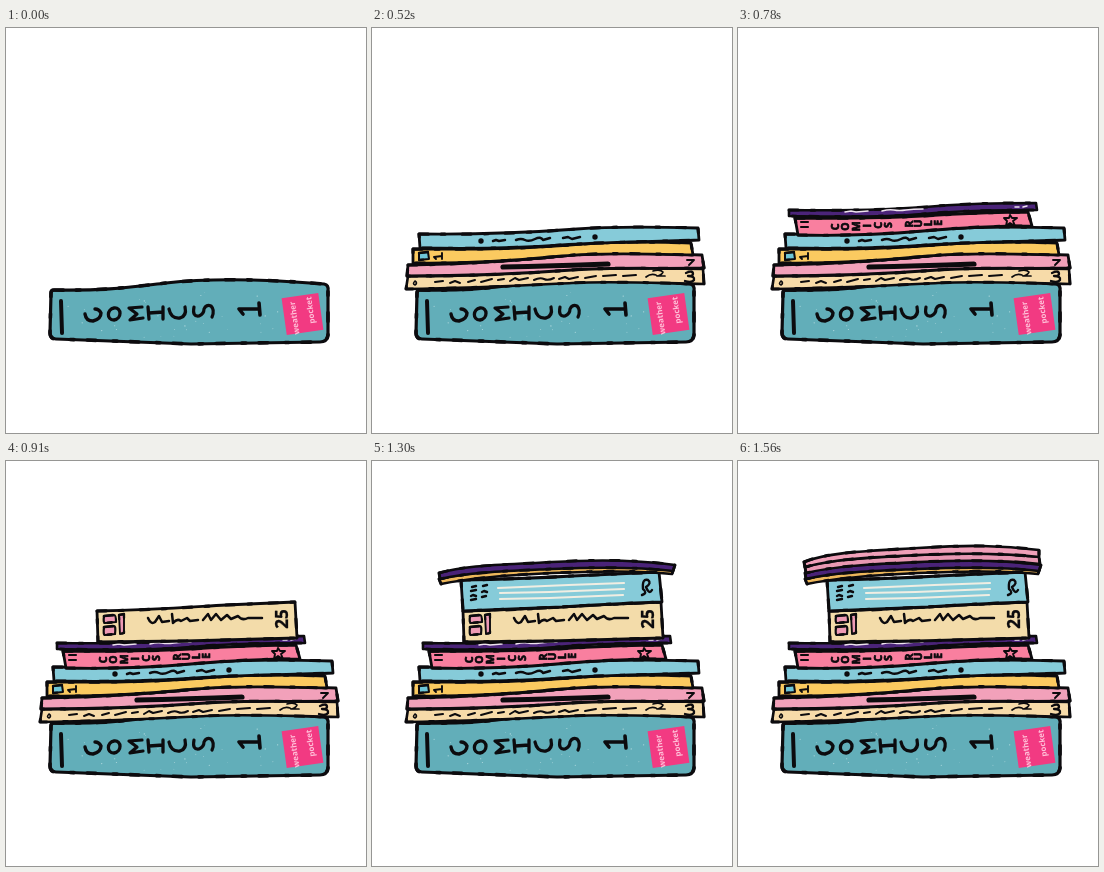
An HTML page with a canvas that plays this animation: 360 by 405 pixels, repeating every 1.82 s.

```html
<!DOCTYPE html>
<html lang="en">
<head>
<meta charset="utf-8">
<title>Book stack</title>
<style>
  html, body { margin: 0; width: 100%; height: 100%; overflow: hidden; background: #fff; }
  canvas { display: block; }
</style>
</head>
<body>
<canvas id="stage" width="360" height="405"></canvas>
<script>
const ctx = document.getElementById("stage").getContext("2d");
const STEP = 130, LOOP = 1820;
const INK = "#0c0b0e";
ctx.lineCap = ctx.lineJoin = "round";

function line(d, width = 2, color = INK) {
  ctx.strokeStyle = color;
  ctx.lineWidth = width;
  ctx.stroke(new Path2D(d));
}

// Filled shape with a slightly uneven, brush-like outline.
function cover(d, fill, width = 2.8) {
  ctx.fillStyle = fill;
  ctx.fill(new Path2D(d));
  line(d, width);
  ctx.setLineDash([9, 13, 4, 17]);
  line(d, width + 0.4);
  ctx.setLineDash([]);
}

function dot(x, y, r, color = INK) {
  ctx.fillStyle = color;
  ctx.beginPath();
  ctx.arc(x, y, r, 0, 7);
  ctx.fill();
}

function glyph(text, x, y, size, angle = -90, color = INK, weight = 0.7) {
  ctx.save();
  ctx.translate(x, y);
  ctx.rotate(angle * Math.PI / 180);
  ctx.font = `bold ${size}px "Open Sans", sans-serif`;
  ctx.textAlign = "center";
  ctx.textBaseline = "middle";
  ctx.fillStyle = ctx.strokeStyle = color;
  ctx.lineWidth = weight;
  ctx.fillText(text, 0, 0);
  if (weight) ctx.strokeText(text, 0, 0);
  ctx.restore();
}

// Letters stacked down the spine, each turned on its side.
function stack(word, x, y, pitch, size) {
  [...word].forEach((c, i) => glyph(c, x + i * pitch, y - i * 0.4, size));
}

function random(seed) {
  return () => (seed = seed * 16807 % 2147483647) / 2147483647;
}

function specks(count, x, y, w, h, seed) {
  const rnd = random(seed);
  for (let i = 0; i < count; i++) {
    dot(x + rnd() * w, y + rnd() * h, 0.3 + rnd() * 0.35, "rgba(235,250,250,.65)");
  }
}

function label() {
  ctx.save();
  ctx.translate(296.5, 286);
  ctx.rotate(-0.14);
  ctx.fillStyle = "#f23a82";
  ctx.fillRect(-18.5, -18.5, 37, 37);
  ctx.restore();
  glyph("weather", 289, 290, 8, -98, "#ffc0d8", 0);
  glyph("pocket", 305, 282, 8, -98, "#ffc0d8", 0);
}

function bigBook() {
  cover("M48 262 C100 263 125 259 160 255 S245 250 318 256 Q323 257 322 263 L322 307 Q321 314 314 314 Q240 315 185 316 Q110 313 50 311 Q44 311 44 305 L45 265 Q45 262 48 262 Z", "#62aeb9", 3.2);
  specks(32, 62, 262, 210, 48, 71);
  line("M55 273 L56 305", 4);
  line("M79 286 Q80 293 87 293 Q95 291 95 285 Q93 281 89 281", 3.4);
  line("M108 280 C116 279 116 291 108 292 C100 292 101 281 108 280", 3.3);
  line("M137 290 L124 292 L131 286 L123 280 L136 279", 3.2);
  line("M142 279 L143 291 M143 285 L157 284 M157 279 L157 291", 3.3);
  line("M163 281 Q165 291 174 290 Q181 288 179 279", 3.3);
  line("M188 279 Q186 289 193 288 Q198 286 198 281 Q200 276 205 278 Q209 282 206 289", 3.2);
  line("M237 286 L233 281 L253 281 M253 275 L254 287", 3.6);
  label();
}

function beigeSlim() {
  cover("M36 248 C110 248 150 245 190 242 S285 240 331 241 L332 256 C280 255 240 253 200 255 S110 260 34 261 Z", "#f7dba9", 2.6);
  line("M43 253 Q46 255 43 257 Q40 256 43 253", 1.6);
  line("M63 254 L71 253 M78 255 L83 253 L88 255 M96 254 L103 252 M109 254 L120 251 M126 252 L132 251 M138 253 L143 250 L147 252 L156 250 M162 252 Q168 249 172 251 T182 250 M187 251 L193 249 L197 251 L206 249 M213 250 L224 248 M231 248 L244 247 M251 248 L264 247", 2);
  line("M274 249 Q279 245 284 247 M281 243 Q288 241 291 244 Q290 247 285 248 L293 248", 1.7);
  line("M314 245 Q321 242 321 246 Q321 248 316 248 Q323 248 322 252 Q320 255 313 253", 2.3);
}

function pinkSlim() {
  cover("M36 237 C100 236 150 232 190 228 S280 225 330 227 L332 240 C280 241 240 239 200 242 S110 248 35 248 Z", "#f2a1ba");
  line("M131 239 Q180 238 236 236", 5.2);
  line("M315 232 L322 232 L317 237", 1.9);
}

function yellowBook() {
  cover("M41 221 C130 222 170 219 210 216 S290 214 319 215 L321 227 C280 226 230 224 190 228 S100 236 41 235 Z", "#fbca60");
  cover("M47 225 L56 224 L57 231 L47 232 Z", "#6ec6d8", 2);
  line("M62 229 L70 228 M70 225 L70 231 M62 229 L64 231", 1.9);
}

function blueSlim() {
  cover("M47 206 C120 207 165 204 205 201 S285 199 326 200 L327 212 C280 214 230 214 190 217 S100 221 48 220 Z", "#86cbd9");
  dot(109, 213, 2.7);
  dot(223, 209, 2.7);
  line("M121 213 L124 212 L127 213 L133 212 M144 212 Q149 210 153 212 T163 211 T171 212 L178 210 M191 210 L196 209 L200 211 L208 209", 2.5);
}

function pinkBook() {
  cover("M57 190 C130 191 165 189 200 187 S265 184 290 184 L294 198 C250 198 220 200 185 203 S100 208 60 207 Z", "#f97f9f");
  line("M63 194 L70 194 M63 199 L70 199", 2.1);
  stack("COMICS", 98, 199, 10.7, 10.5);
  stack("RULE", 172, 196, 9.7, 10.5);
  line("M272 187 L274 190 L279 190 L275 193 L277 198 L272 195 L268 198 L269 193 L266 190 L271 190 Z", 1.9);
}

function purpleSlim() {
  cover("M51 182 C120 183 165 181 200 178 S265 175 298 175 L299 182 C250 182 220 183 185 186 S100 189 51 188 Z", "#4b2479", 2.6);
  line("M107 184 L113 183 L118 184 L130 183 M144 183 Q151 181 156 182 T168 182 T185 181 M277 179 L281 179 M285 179 L289 178", 1.5, "#eee4ee");
}

function beigeBook() {
  cover("M91 150 C150 149 185 146 220 144 L289 141 L291 177 Q220 179 180 180 L92 181 Z", "#f3dcaa");
  cover("M98 155 L108 154 Q110 154 110 161 L99 162 Q97 162 98 155 Z", "#ee9ab5", 2.2);
  cover("M98 166 L108 165 Q110 165 109 173 L99 174 Q97 174 98 166 Z", "#ee9ab5", 2.2);
  cover("M113 154 L118 153 L118 172 L114 173 Z", "#ee9ab5", 1.9);
  line("M142 157 Q145 164 149 161 L153 155 L156 161 L163 160 M166 153 L167 162 Q171 157 175 160 L181 157 L184 160 L192 159 M197 159 L202 153 L205 159 L210 153 L215 159 L221 154 L225 158 L232 155 Q236 160 242 157 L256 157", 2.5);
  glyph("25", 278, 158, 17, -90, INK, 0.3);
}

function blueBook() {
  cover("M89 119 Q150 118 200 115 L287 111 L290 141 Q235 143 190 146 L91 150 Z", "#86cbd9");
  line("M126 127 Q190 124 252 122 M128 132 Q190 131 252 128 M128 138 Q190 137 251 134", 2.2, "#f0eee3");
  line("M99 139 L104 138 M99 135 L101 134 L104 135 M99 130 L104 129 M100 126 L104 125 M110 136 L114 135 M110 131 L112 130 L115 131 M111 125 L115 124", 2.4);
  line("M270 134 Q276 132 271 128 Q270 117 276 119 Q280 122 274 126 Q277 134 280 129", 2.4);
}

function yellowTop() {
  cover("M67 118 C98 111 135 109 180 107 S265 105 302 107 L300 113 C265 109 225 110 180 112 S98 117 69 123 Z", "#edb75b", 2.5);
}

function purpleTop() {
  cover("M67 112 C95 104 130 104 180 101 S268 99 303 104 L301 110 C266 106 225 106 180 108 S98 111 68 118 Z", "#4a2378", 2.5);
}

function lowerPinkTop() {
  cover("M67 106 C93 98 130 97 180 94 S265 92 301 96 L302 103 C266 99 225 99 180 101 S96 105 68 112 Z", "#e998b3", 2.5);
}

function upperPinkTop() {
  cover("M66 101 C90 91 130 90 180 87 S262 84 301 89 L301 96 C265 92 225 92 180 94 S96 98 67 106 Z", "#f0a0b9", 2.7);
}

const books = [
  bigBook, beigeSlim, pinkSlim, yellowBook, blueSlim, pinkBook, purpleSlim,
  beigeBook, blueBook, yellowTop, purpleTop, lowerPinkTop, upperPinkTop
];

const start = performance.now();
let shown = -1;

function frame() {
  const time = (performance.now() - start) % LOOP;
  const count = Math.min(books.length, Math.floor(time / STEP) + 1);
  if (count !== shown) {
    shown = count;
    ctx.fillStyle = "#fff";
    ctx.fillRect(0, 0, 360, 405);
    books.slice(0, count).forEach(draw => draw());
  }
  requestAnimationFrame(frame);
}
frame();
</script>
</body>
</html>
```
